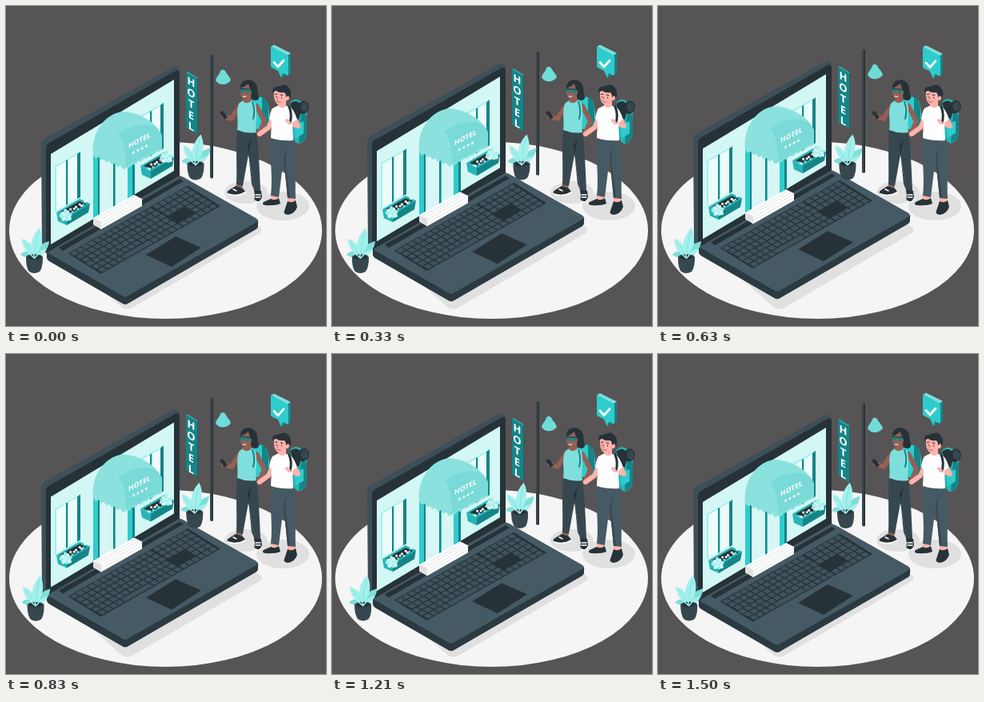
These frames come from a looping animation (400 px wide and 400 px high, 1.54 s). An HTML page:

```html
<!DOCTYPE html>
<html lang="en">
<head>
<meta charset="utf-8">
<title>Hotel booking</title>
<style>
html, body { margin: 0; width: 100%; height: 100%; overflow: hidden; background: #575455; }
svg { display: block; width: 100%; height: 100%; }
text { font-family: "Open Sans", Lato, sans-serif; font-weight: 700; text-anchor: middle; fill: #fff; }
.ink { fill: #263238; }
.slate { fill: #37474f; }
.teal { fill: #27b4b6; }
.deep { fill: #168487; }
.bright { fill: #2fcccd; }
.mint { fill: #a3f0ec; }
.aqua { fill: #7fdfdc; }
.pale { fill: #ecfcfb; }
.white { fill: #fff; }
.brown { fill: #955f55; }
.pink { fill: #ffb3ac; }
.shade { fill: #e0e0e0; }
.line { fill: none; stroke-linecap: round; stroke-linejoin: round; }
</style>
</head>
<body>
<svg viewBox="0 0 400 400">
  <defs>
    <g id="plant">
      <path class="aqua" d="M18 311C23 304 31 306 35 316C28 315 23 314 18 311ZM54 294C53 305 46 311 36 314C36 303 43 297 54 294Z"/>
      <path class="mint" d="M35 314C28 303 31 288 42 277C48 290 45 304 36 314ZM20 291C30 293 35 302 35 314C27 309 20 302 20 291ZM51 304C47 311 43 314 36 316C38 309 43 304 51 304Z"/>
      <path class="line" stroke="#6fddda" stroke-width=".7" d="M36 314Q36 297 41 282M34 312Q30 302 23 295M37 313Q43 302 50 297"/>
      <path class="slate" d="M25 314C25 322 26 328 29 332Q35 336 42 332C45 328 46 322 46 314Z"/>
      <ellipse class="slate" cx="35.500" cy="314" rx="10.500" ry="3.800"/>
      <ellipse class="ink" cx="35.500" cy="314" rx="8.500" ry="2.700"/>
      <path class="line" stroke="#a3f0ec" stroke-width="1.500" d="M35 315L35 306M36 315L41 309M34 314L29 309"/>
    </g>
    <g id="flowerbox">
      <path class="teal" d="M63 258L92 241L105 247L76 264Z"/>
      <path class="ink" d="M67 258L92 244L101 248L77 261Z"/>
      <path class="teal" d="M63 258L76 264V274L65 269Z"/>
      <path class="deep" d="M76 264L105 247L103 258L76 274Z"/>
      <path class="line" stroke="#27b4b6" d="M76 264L105 247"/>
    </g>
  </defs>

  <ellipse cx="199.500" cy="280.500" rx="195.500" ry="110.500" fill="#f5f5f5"/>
  <path class="shade" d="M90 328L220 217L317 276Q322 280 317 284L158 377Q150 381 144 376Z"/>
  <ellipse class="shade" cx="300" cy="233" rx="27" ry="14"/>
  <ellipse class="shade" cx="346" cy="250" rx="33" ry="18"/>

  <g id="scene">
    <!-- street sign and lamp -->
    <path class="teal" d="M225 83L227 82L240 90L239 91Z"/>
    <path class="deep" d="M225 83L239 91V160L225 152Z"/>
    <path fill="#106a6e" d="M239 91L240 90V159L239 160Z"/>
    <g id="sign" font-size="13"></g>
    <path class="slate" d="M255 62Q257 60 259 62V214Q257 217 255 214Z"/>
    <path class="ink" d="M257.500 61L259 62V214L257.500 216Z"/>
    <path fill="#6fdcda" d="M268 81Q271 78 274 81C276 86 280 88 281 93Q277 98 271 98Q265 98 262 93C263 88 267 86 268 81Z"/>

    <!-- laptop base -->
    <path fill="#2b3941" d="M51 304L217 212L313 266Q316 268 315 272V275Q315 278 311 280L154 371Q149 375 144 371L54 319Q50 316 51 312Z"/>
    <path fill="#455a64" d="M53 306L212 214Q217 211 222 214L312 265Q317 268 312 271L153 362Q149 365 145 362L53 309Z"/>
    <path class="ink" d="M66 302L217 216L222 219L71 306Z"/>
    <path id="keyboard" class="ink"/>
    <path id="keys" fill="#40535d"/>
    <path class="ink" d="M175 311L212 288L244 302L207 326Z"/>

    <!-- laptop lid -->
    <path fill="#3d4f59" d="M45 305L44 174Q44 169 48 166L208 77Q213 74 217 79V212L50 309Z"/>
    <path class="ink" d="M50 307V177Q50 173 54 171L212 81Q217 79 217 84V212L53 307Z"/>
    <path fill="#d3f7f5" d="M56 185L210 92V206L56 298Z"/>

    <!-- windows -->
    <path class="mint" d="M61 200L93 182V239L61 258ZM168 137L197 121V178L168 195Z"/>
    <path class="pale" d="M63 201L75 194V249L63 256ZM78 192L89 186V240L78 247ZM169 139L180 133V187L169 193ZM183 131L193 125V179L183 185Z"/>
    <path class="deep" d="M75 193L77 192V248L75 249ZM89 185L93 182V239L89 241ZM180 132L182 131V187L180 188ZM193 124L197 121V178L193 180Z"/>

    <!-- doorway -->
    <path class="bright" d="M109 184H161V240L109 269Z"/>
    <path fill="#d6f7f5" d="M117 188H134V253L117 263ZM137 192H152V243L137 252Z"/>
    <path class="deep" d="M115 184H117V263L115 265ZM134 190H136V252L134 253ZM158 190H161V238L158 240Z"/>
    <path class="white" d="M109 265L160 236L170 241V250L119 279L109 273Z"/>
    <path class="shade" d="M109 265L119 270V279L109 273Z"/>
    <path class="line" stroke="#d8dcdd" stroke-width=".8" d="M112 267L163 238M115 269L166 240M119 271L170 242M119 275L170 246"/>

    <!-- awning -->
    <path fill="#8be1de" d="M109 186C106 160 122 135 146 132C168 133 189 146 195 162V178q-4 6 -7.500 4q-4 6 -7.500 4q-4 6 -7.500 4q-4 6 -7.500 4q-4 6 -7.500 4q-4 6 -7.500 4q-4 5 -6.800 -2.700q-5 4 -6.800 -2.700q-5 4 -6.800 -2.700q-5 4 -6.800 -2.700q-5 4 -6.800 -2.700q-5 4 -6.800 -2.700Z"/>
    <path fill="#79dad7" d="M150 201C150 182 147 168 141 160C160 146 180 145 191 155Q195 160 195 165V177Z"/>
    <text transform="translate(167 171) skewY(-27)" font-size="8.600">HOTEL</text>
    <text transform="translate(167.500 181) skewY(-27)" font-size="6" style="font-family:'DejaVu Sans',sans-serif">★★★★</text>

    <!-- flowers -->
    <use href="#flowerbox"/>
    <use href="#flowerbox" x="105" y="-58"/>
    <g id="flowers"></g>
  </g>

  <use id="plantLeft" href="#plant"/>
  <use id="plantRight" href="#plant"/>

  <!-- woman -->
  <path class="bright" d="M307 117Q318 109 326 119Q331 132 328 148Q322 157 311 153Z"/>
  <path class="deep" d="M320 113Q327 117 328 128V149Q324 154 320 154Z"/>
  <path class="brown" d="M288 222L296 223L295 229H287ZM310 228L318 229L318 235L311 235Z"/>
  <path class="slate" d="M289 153L313 156C316 180 317 206 318 231L310 230L303 186L296 225L288 223C289 199 287 177 289 153Z"/>
  <path class="ink" d="M302 174L307 166L303 186L310 230L307 222ZM287 225L296 228L299 232Q291 238 279 235Q274 233 279 230Z"/>
  <path class="ink" d="M310 230L319 231L320 239Q319 246 314 245Q309 243 311 237Z"/>
  <path class="line" stroke="#fff" stroke-width="1.500" d="M278 235Q289 239 299 233M312 244Q317 247 320 241M284 229L288 231M312 236H318M312 239H318"/>
  <path class="line" stroke="#955f55" stroke-width="6" d="M292 126Q286 133 282 141L272 138M313 125L323 144L316 160"/>
  <path class="ink" d="M293 102C293 91 307 89 312 97C316 102 313 107 316 112Q317 118 311 118Q305 117 303 110Z"/>
  <path class="aqua" d="M291 122L296 118Q301 124 306 117L312 122C315 135 311 147 313 158Q301 160 289 155C291 144 287 133 291 122Z"/>
  <path class="brown" d="M298 112L306 112L307 118Q302 124 296 119Z"/>
  <path class="brown" d="M293 101Q300 100 304 96Q309 104 306 112Q302 118 296 116Q292 111 293 101Z"/>
  <path class="ink" d="M293 103C293 93 303 90 309 97L307 107Q304 102 303 97Q298 101 293 103Z"/>
  <circle class="deep" cx="295.500" cy="105.500" r="2.800"/>
  <circle class="deep" cx="302.500" cy="106" r="2.900"/>
  <path class="line" stroke="#263238" d="M293 103.500L308 104.500"/>
  <path class="line" stroke="#fff" d="M296 113Q298 114 300 113"/>
  <path class="line" stroke="#168487" stroke-width="2" d="M308 120Q312 130 309 141"/>
  <path class="ink" d="M267 133L271 131L277 139L273 142Z"/>

  <!-- man -->
  <g id="pack">
    <path class="teal" d="M355 121Q361 113 369 119Q376 124 376 137V162Q373 171 365 172L355 164Z"/>
    <path class="deep" d="M369 133Q375 132 376 139V162Q373 170 366 171Z"/>
    <path class="bright" d="M360 148L372 144V159L362 165Z"/>
    <path class="ink" d="M355 122Q362 116 367 121Q373 115 378 122Q380 128 377 131Q373 136 368 134L366 142Q360 138 358 130Z"/>
    <ellipse class="slate" cx="373" cy="126" rx="4.500" ry="6"/>
  </g>
  <path class="pink" d="M331 234H341L340 244H331ZM352 237H362V247H352Z"/>
  <path fill="#455a64" d="M331 164L360 166C364 189 361 217 362 241L352 240L347 190L341 239L331 237C334 213 329 188 331 164Z"/>
  <path class="slate" d="M347 190L351 176L349 192L355 240H352Z"/>
  <path class="ink" d="M331 241Q336 244 341 240L343 247Q336 250 324 249Q319 248 322 245ZM352 244Q357 247 362 243L364 251Q361 260 352 261Q346 260 348 256Z"/>
  <path class="line" stroke="#ffb3ac" stroke-width="6" d="M334 139L328 152L317 160M359 138L365 150L354 146"/>
  <path class="white" d="M333 128L341 124L349 124L358 129Q363 136 363 142L358 146L359 168Q344 169 331 165L332 144L329 141Q330 133 333 128Z"/>
  <path class="line" stroke="#263238" stroke-width="3" d="M354 126Q358 136 355 146"/>
  <path class="pink" d="M340 117H350V125Q344 130 340 124Z"/>
  <path class="pink" d="M335 106Q342 103 350 107L351 112Q355 111 354 116Q352 119 349 118Q346 125 340 123Q334 120 335 106Z"/>
  <path class="ink" d="M334 109Q331 101 339 101Q350 95 354 103Q358 108 355 116L353 112L350 114Q350 110 348 108Q341 109 338 106Q335 106 334 109Z"/>
  <path class="line" stroke="#263238" d="M338 113V114M344.500 114V115M336.500 110.500L339 110M343 111L346 111.500"/>
  <path class="line" stroke="#b55353" stroke-width=".9" d="M338 119Q340 121 343 120M340 114L339 117"/>
  <path class="line" stroke="#ffb3ac" stroke-width="4" d="M351 143L354 146"/>

  <!-- speech bubble -->
  <g id="bubble">
    <path class="aqua" d="M331 51L335 48.500L356 59L352 62Z"/>
    <path class="deep" d="M352 62L356 59V84L352 87L348 85L348 88L344 90Z"/>
    <path class="bright" d="M331 52Q331 50 333 51L351 61Q353 62 353 64V85Q353 88 350 86L346 84L344 90L340 81L332 77Q331 76 331 75Z"/>
    <path class="line" stroke="#fff" stroke-width="2.800" d="M335 70.500L340 76L347 68"/>
  </g>
</svg>
<script>
const LOOP = 1540;
const $ = id => document.getElementById(id);

$("sign").innerHTML = [..."HOTEL"].map((letter, i) =>
  `<text transform="translate(231.500 ${99.8 + i * 13.8}) skewY(28)">${letter}</text>`).join("");

// Keyboard plane: u runs along the hinge, v towards the viewer.
const point = (u, v) => `${(80 + 148 * u + 40 * v).toFixed(1)} ${(309 - 84 * u + 25 * v).toFixed(1)}`;
const key = (u, v, w, h) => `M${point(u, v)}L${point(u + w, v)}L${point(u + w, v + h)}L${point(u, v + h)}Z`;
let keys = "";
for (let row = 0; row < 6; row++) {
  for (let col = 0; col < 20; col++) {
    const space = row === 5 && col > 3 && col < 9;
    if (space && col > 4) continue;
    const arrowGap = (row === 3 || row === 4) && col > 13 && col < 17;
    if (arrowGap) continue;
    const shift = col < 14 ? (row % 3) * 0.004 : 0.012;
    keys += key(col * 0.049 + shift, row / 6, space ? 0.237 : 0.04, 0.135);
  }
}
$("keys").setAttribute("d", keys);
$("keyboard").setAttribute("d", key(-0.01, -0.02, 1.01, 1.02));

// Blossoms in each window box, plus one round bush.
const dot = (x, y, r, fill) => `<circle cx="${x}" cy="${y}" r="${r}" fill="${fill}"/>`;
function flowers(x, y, bushX, bushY) {
  let out = "";
  for (let i = 0; i < 11; i++) {
    out += dot(x + i * 2.3, y - i * 1.25 + Math.sin(i * 2.4) * 2.5, 1.5, i % 3 ? "#fff" : "#6fddda");
  }
  for (let i = 0; i < 18; i++) {
    const r = Math.sqrt(i / 18) * 6.5, a = i * 2.4;
    out += dot(bushX + r * Math.cos(a), bushY + r * Math.sin(a), 2.2, i % 2 ? "#a3f0ec" : "#d3f7f5");
  }
  return out;
}
$("flowers").innerHTML = flowers(76, 259, 75, 262) + flowers(177, 203, 201, 189);

const move = (id, x, y, turn = "") => $(id).setAttribute("transform", `translate(${x} ${y})${turn}`);
const wave = (t, peak) => Math.cos(2 * Math.PI * (t - peak) / LOOP);

function draw(now) {
  const t = now % LOOP;
  move("scene", 0, -3.4 - 3.5 * wave(t, 700));
  move("bubble", 0, 0.4 + 0.5 * wave(t, 900));
  move("pack", 0, 0.4 * wave(t, 100));
  const p = Math.min(1, Math.max(0, (t - 640) / 380));
  const slide = p * p * (3 - 2 * p);
  move("plantLeft", 2.6 * slide, -0.5 * slide, ` rotate(${-2 * slide} 36 300)`);
  move("plantRight", 201.5 - 3 * slide, -116.5 + 0.5 * slide, ` rotate(${-2 * slide} 36 300)`);
  requestAnimationFrame(draw);
}
draw(performance.now());
</script>
</body>
</html>
```
